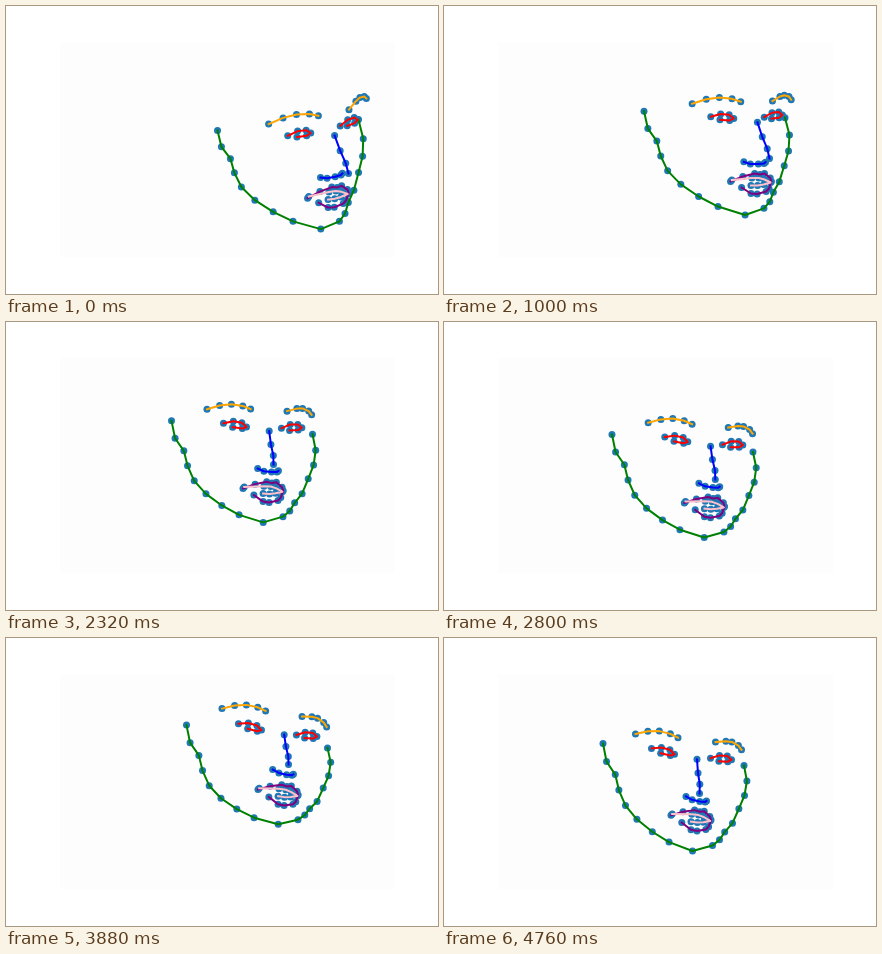
Write an HTML page that moves like this. It is 432x288 px and loops after 4800 ms.

```html
<!DOCTYPE html>
<html lang="en">
<head>
<meta charset="utf-8">
<title>Face landmarks</title>
<style>
html, body { margin: 0; width: 100%; height: 100%; overflow: hidden; background: #fff; }
svg { display: block; width: 432px; height: 288px; }
</style>
</head>
<body>
<svg id="stage" viewBox="0 0 432 288"></svg>
<script>
const LOOP = 4800, STEP = 40;
const NS = 'http://www.w3.org/2000/svg';
const stage = document.getElementById('stage');

// Where the nose tip goes: [time, x, y]
const MOVE = [
  [0, 342, 167], [560, 329.5, 150.5], [680, 326.5, 146], [1000, 325, 152],
  [1120, 328.5, 160], [1360, 329, 163], [1560, 319, 166], [1680, 305, 163],
  [1960, 286.5, 135.5], [2240, 269.5, 139], [2320, 267, 142], [2820, 271, 157],
  [3240, 276, 135], [3360, 279.5, 126.5], [3600, 282, 130.5], [3880, 282, 126],
  [4240, 266, 158], [4480, 253.5, 151], [4600, 252, 148.5], [4760, 255, 155]
];

// How the head turns: [time, yaw, pitch, roll]
const TURN = [
  [0, -34.5, -8.5, -23], [1000, -29, -4, -3], [1560, -19.5, -10.5, 8], [2320, -5.5, 3, 5],
  [3240, -8, 4.5, 15], [3880, -5.5, 12, 16], [4760, 0, 1, 15]
];

// Key points from the nose tip: x, y, then the pull of yaw on x, of pitch and roll on y
const KEYS = {
  earL: [-96.5, -44.5, 1, 1, -0.43],
  cheekL: [-74, 15, 0.96, 0.85, -0.25],
  chin: [-7, 57.3, 0.6, 0.2, 0],
  cheekR: [33, 26.3, 0.8, 0.65, 0.18],
  earR: [44.5, -35.5, 1, 1, 0.43],
  browL1: [-64, -54.5, 0.46, 0.35, -0.35],
  browL2: [-21.5, -56, 0.25, 0.2, 0],
  browR1: [16, -55.5, 0.45, 0.3, 0.25],
  browR2: [42, -54.7, 0.7, 0.5, 0.7],
  eyeL1: [-48, -41, 0.37, 0.42, -0.3],
  eyeL2: [-25, -38.5, 0.37, 0.45, -0.08],
  eyeR1: [11, -38.7, 0.56, 0.5, 0.2],
  eyeR2: [32, -40.3, 0.66, 0.5, 0.4],
  bridge: [-2.5, -34.6, 0.33, 0.4, 0],
  tip: [0, 0, 0, 0, 0],
  nostrilL: [-13.5, 3.9, 0.42, 0.2, -0.08],
  nostrilR: [7, 5, 0.38, 0.2, 0.15],
  mouthL: [-28.5, 23.8, 0.36, 0.3, -0.15],
  mouthR: [11.5, 24.7, 0.33, 0.35, 0.1]
};

// A strand runs from key a to key b; each step is [share of the way, dx, dy]
const eye = [[0, 0, 0], [0.43, 0, -3.5], [0.8, 0, -3.4], [1, 0, 0], [0.82, 0, 2.3], [0.4, 0, 2.4]];
const strand = (a, b, ...steps) => ({ a, b, steps });
const PARTS = [
  ['green',
    strand('earL', 'cheekL', [0, 0, 0], [0.29, -3, 0], [0.5, 1, 0], [0.75, -1, 0]),
    strand('cheekL', 'chin', [0, 0, 0], [0.17, 0, 6], [0.4, 0, 8], [0.65, 0, 7]),
    strand('chin', 'cheekR', [0, 0, 0], [0.2, 12, 0], [0.4, 11, 0], [0.68, 5, 0]),
    strand('cheekR', 'earR', [0, 0, 0], [0.25, 3.5, 0], [0.48, 6.5, 0], [0.73, 6, 0], [1, 0, 0])],
  ['orange', strand('browL1', 'browL2', [0, 0, 0], [0.29, 0, -3.8], [0.56, 0, -5], [0.82, 0, -3.2], [1, 0, 0])],
  ['orange', strand('browR1', 'browR2', [0, 0, 0], [0.4, 0, -4], [0.63, 0, -5], [0.88, 0, -3.3], [1, 0, 0])],
  ['blue', strand('bridge', 'tip', [0, 0, 0], [0.4, 0, 0], [0.73, 1, 0], [1, 0, 0])],
  ['blue', strand('nostrilL', 'nostrilR', [0, 0, 0], [0.3, 0, 2], [0.67, 0, 2], [0.93, 0, 1.3], [1, 0, 0])],
  ['red', strand('eyeL1', 'eyeL2', ...eye)],
  ['red', strand('eyeR1', 'eyeR2', ...eye)],
  ['purple', strand('mouthL', 'mouthR',
    [0, 0, 0], [0.3, 0, -5], [0.59, 0, -8], [0.72, 0, -7], [0.83, 0, -8], [0.97, 0, -3.5],
    [1, 0, 0], [0.94, 0, 7], [0.87, 0, 10], [0.65, 0, 12.5], [0.5, 0, 12], [0.27, 0, 6])],
  ['pink', strand('mouthL', 'mouthR',
    [0.03, 0, -1.5], [0.52, 0, -3.5], [0.69, 0, -3.5], [0.83, 0, -2],
    [0.98, 0, 1], [0.81, 0, 3], [0.66, 0, 4], [0.5, 0, 4])]
];

const mix = (a, b, k) => a + (b - a) * k;

// Slope at a knot, limited so that the curve does not overshoot
function slope(track, i, c) {
  if (i === 0 || i === track.length - 1) return 0;
  const rise = n => (track[n + 1][c] - track[n][c]) / (track[n + 1][0] - track[n][0]);
  const a = rise(i - 1), b = rise(i);
  return a * b > 0 ? 2 * a * b / (a + b) : 0;
}

// Every column of a track at time t, by cubic interpolation
function sample(track, t) {
  let i = 0;
  while (i < track.length - 2 && t >= track[i + 1][0]) i++;
  const p = track[i], q = track[i + 1], span = q[0] - p[0];
  const k = Math.min(1, (t - p[0]) / span), j = 1 - k;
  return p.slice(1).map((v, n) => {
    const c = n + 1;
    return v * j * j * (1 + 2 * k) + q[c] * k * k * (3 - 2 * k)
      + span * k * j * (slope(track, i, c) * j - slope(track, i + 1, c) * k);
  });
}

function add(tag, attrs) {
  const el = document.createElementNS(NS, tag);
  for (const name in attrs) el.setAttribute(name, attrs[name]);
  return stage.appendChild(el);
}

add('rect', { x: 54, y: 36, width: 335, height: 215, fill: '#fdfdfd' });
const dots = PARTS.map(([, ...strands]) => strands.flatMap(s => s.steps)
  .map(() => add('circle', { r: 3.5, fill: '#1f77b4' })));
const lines = PARTS.map(([stroke]) => add('polyline', {
  fill: 'none', stroke, 'stroke-width': 2, 'stroke-linejoin': 'round', 'stroke-linecap': 'square'
}));

function draw(t) {
  const [x, y] = sample(MOVE, t), [yaw, pitch, roll] = sample(TURN, t);
  const place = key => {
    const [kx, ky, turn, nod, tilt] = KEYS[key];
    return [x + 0.5 + kx + turn * yaw, y + 0.5 + ky + nod * pitch + tilt * roll];
  };
  const trace = ({ a, b, steps }) => {
    const p = place(a), q = place(b);
    return steps.map(([k, dx, dy]) => [mix(p[0], q[0], k) + dx, mix(p[1], q[1], k) + dy]);
  };
  PARTS.forEach(([, ...strands], n) => {
    const pts = strands.flatMap(trace);
    lines[n].setAttribute('points', pts.join(' '));
    pts.forEach(([cx, cy], i) => {
      dots[n][i].setAttribute('cx', cx);
      dots[n][i].setAttribute('cy', cy);
    });
  });
}

function tick() {
  const t = performance.now() % LOOP;
  draw(Math.floor(t / STEP) * STEP);
  requestAnimationFrame(tick);
}
tick();
</script>
</body>
</html>
```
